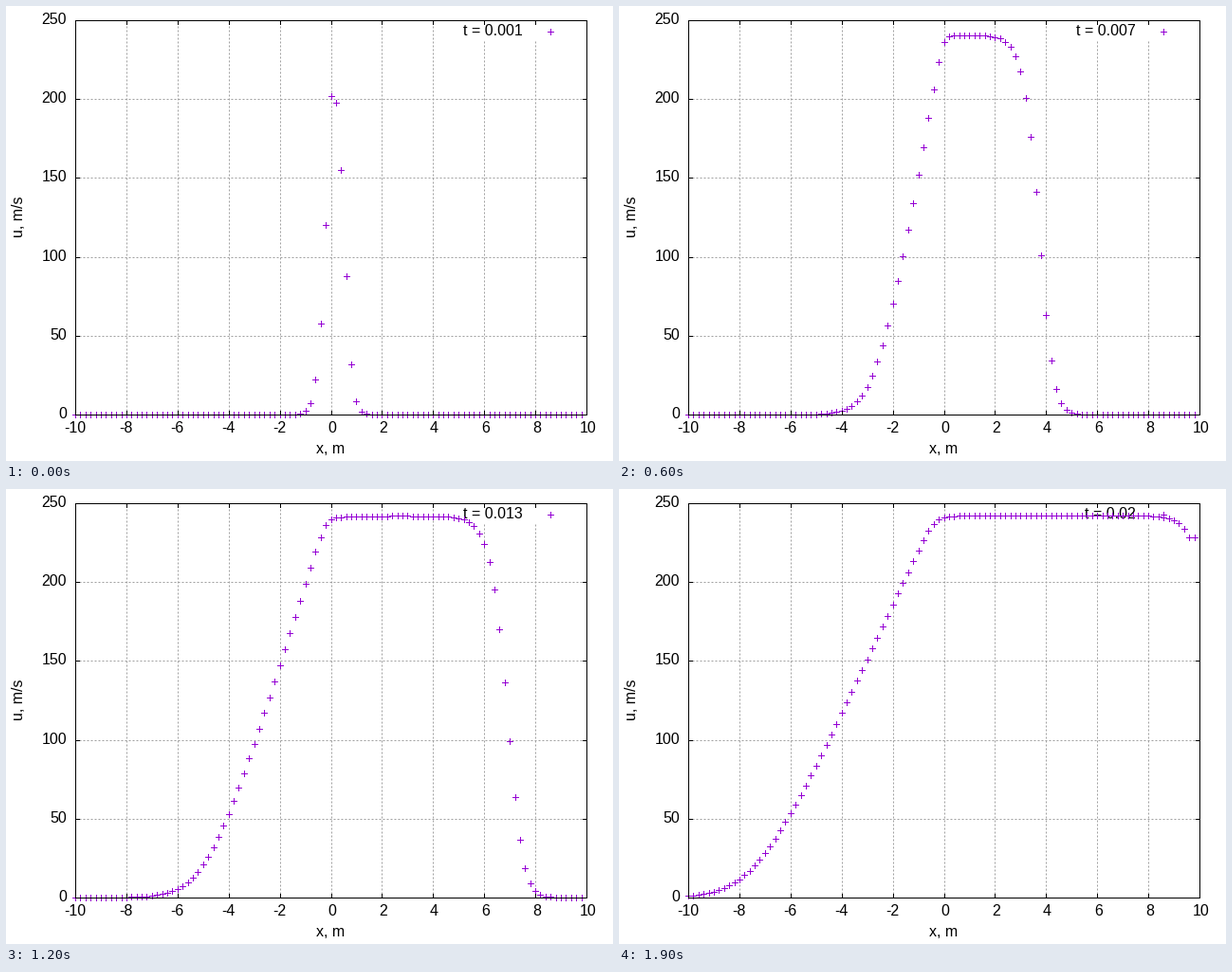
Write a matplotlib script that moves like this. It is 640 px wide and 480 px high and loops after 2000 ms.

```python
import numpy as np
import matplotlib.pyplot as plt
from matplotlib.animation import FuncAnimation
from matplotlib.markers import MarkerStyle

DPI = 100
PX = 72 / DPI                      # one pixel in points
LEFT, RIGHT, TOP, BOTTOM = 73, 612, 15, 431
FRAMES, STEP = 20, 0.001
LIMIT = 243.2                      # plateau velocity, m/s
SPEED = 530                        # shock speed, m/s
PURPLE, GREY = "#9400d3", "#a0a0a0"

plt.rcParams["font.family"] = "Liberation Sans"
plt.rcParams["font.size"] = 16 * PX
plt.rcParams["text.kerning_factor"] = 6    # even digit spacing

X = np.linspace(-10, 9.8, 100)
Q = np.linspace(0.0005, 0.9995, 2000)      # fraction of the plateau


def to_px(x):
    return LEFT + (x + 10) * (RIGHT - LEFT) / 20


def to_py(u):
    return BOTTOM - u * (BOTTOM - TOP) / 250


def fan(t):
    """Rarefaction: each level drifts linearly and smears with sqrt(t)."""
    tau = t / (FRAMES * STEP)
    drift = 6.46 - 4.7 * Q - Q ** 2
    smear = (-0.5 - 0.75 * np.log(Q) + 0.17 * Q ** 4
             - 0.0105 * (1 - Q) ** -0.75)
    lag = 0.026 * np.exp((STEP - t) / 0.002)
    return np.interp(X, -drift * tau - smear * np.sqrt(tau) - lag, Q, left=0)


def shock(t):
    """Smeared step, steep at first, moving right at constant speed."""
    s = np.clip(X - SPEED * t + 0.005, -4, 4)
    k = 2.8 + 4.12 * np.exp(-t / 0.0026)
    return (1 + (2 ** 0.7 - 1) * np.exp(s * (k + 0.1 * s))) ** (-1 / 0.7)


def velocity(t):
    u = (LIMIT - 0.0152 / t) * fan(t) * shock(t)
    u[-1] = u[-2]                  # open right end
    return u


fig = plt.figure(figsize=(640 / DPI, 480 / DPI), dpi=DPI, facecolor="white")
ax = fig.add_axes([0, 0, 1, 1])
ax.set_xlim(0, 640)
ax.set_ylim(480, 0)
ax.axis("off")


def line(xs, ys, color="black", z=4, **kw):
    ax.plot(xs, ys, color=color, lw=PX, zorder=z, dash_capstyle="butt", **kw)


def grid(xs, ys):
    line(xs, ys, GREY, 1, ls=(0, (2, 2)))


def label(x, y, s, ha="center"):
    return ax.text(x, y, s, ha=ha, va="baseline", zorder=2)


for v in range(-10, 11, 2):
    px = to_px(v)
    if -10 < v < 10:
        grid([px, px], [BOTTOM, 35 if v in (6, 8) else TOP])  # legend gap
    line([px, px], [BOTTOM, BOTTOM - 4])
    line([px, px], [TOP, TOP + 4])
    label(px + 1.2 * (v >= 0), 450.5, str(v))

for v in range(0, 251, 50):
    py = round(to_py(v))
    if 0 < v < 250:
        grid([LEFT, RIGHT], [py, py])
    line([LEFT, LEFT + 4], [py, py])
    line([RIGHT, RIGHT - 4], [py, py])
    label(64, py + 4, str(v), "right")

line([LEFT, RIGHT, RIGHT, LEFT, LEFT], [TOP, TOP, BOTTOM, BOTTOM, TOP])
label(342, 472, "x, m")
ax.text(13, 222, "u, m/s", rotation=90, ha="center", va="center")

mark = dict(ls="none", marker=MarkerStyle("+", capstyle="projecting"),
            ms=6 * PX, mew=PX, color=PURPLE, zorder=3)
ax.plot([574], [27], **mark)
points, = ax.plot([], [], **mark)
clock = label(545, 31, "", "right")


def draw(i):
    t = (i + 1) * STEP
    points.set_data(to_px(X), to_py(velocity(t)))
    clock.set_text(f"t = {t:g}")
    return points, clock


anim = FuncAnimation(fig, draw, frames=FRAMES, interval=100,
                     init_func=lambda: draw(0), repeat=True, repeat_delay=0)
plt.show()
```
